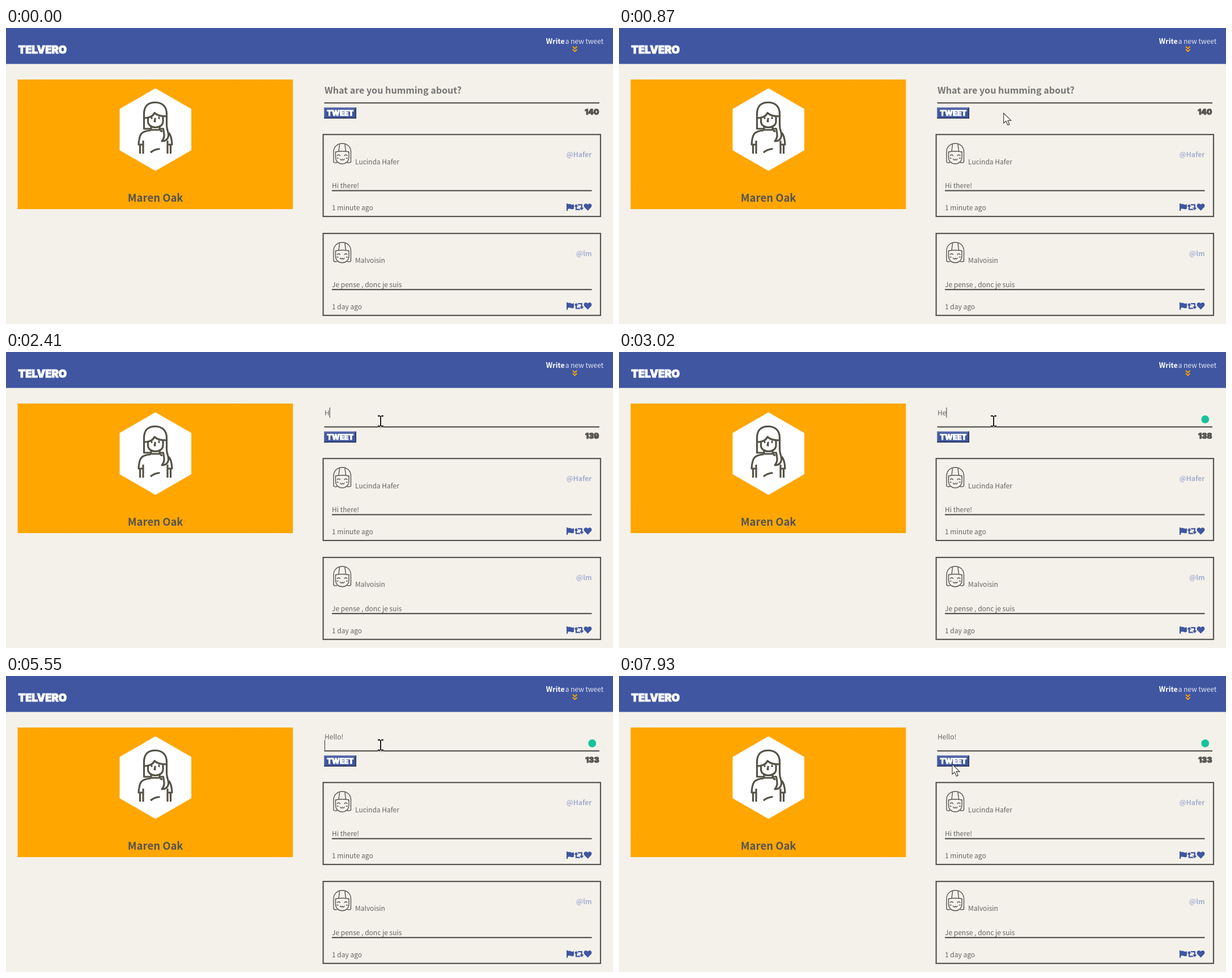
These frames come from a looping animation (1071x523 px, 8000 ms). An HTML page:

```html
<!DOCTYPE html>
<html lang="en">
<head>
<meta charset="utf-8">
<title>Short message page</title>
<style>
  html, body { margin: 0; width: 100%; height: 100%; overflow: hidden; background: #f4f1ea; }
  svg { display: block; width: 1071px; height: 523px; }
  text { font: 12px "Noto Sans CJK SC", "Noto Sans CJK JP", "Noto Sans CJK KR", "Noto Sans CJK", "Open Sans", sans-serif; }
  .thin { font-weight: 300; fill: #656562; }
  .semi { font-weight: 600; }
  .end { text-anchor: end; }
  .block { font-family: Inter, "DejaVu Sans", sans-serif; font-weight: 900; stroke-width: 1; }
  .white { fill: #fff; stroke: #fff; }
  .handle { fill: #a6afd1; }
  .line { fill: none; stroke: #545451; stroke-width: 2.2; }
  .face { fill: none; stroke: #555551; stroke-width: 1.4; stroke-linecap: round; }
  .person { fill: none; stroke: #545146; stroke-width: 3.2; stroke-linejoin: round; }
  .blue { fill: #4056a1; }
  .shadow { fill: #bec2d5; }
</style>
</head>
<body>
<svg viewBox="0 0 1071 523">
  <defs>
    <g id="girl" class="face">
      <path d="M578 237V219C578 199 608.500 199 608.500 219V237Q605 239 602 237.500M578 237Q581 239 584 237.500"/>
      <path d="M581.500 219V228C581.500 244 605 244 605 228V219"/>
      <path d="M581.500 219Q593 216.500 605 219M588.500 206L587 217.500M598 206L599.500 217.500"/>
      <path d="M584.500 225.500Q587 222.500 589.500 225.500M597 225.500Q599.500 222.500 602 225.500"/>
      <path d="M584 230H586M600.500 230H602.500M589.500 231.500Q591.500 235 593.300 232Q595 235 597 231.500"/>
    </g>
    <g id="icons" class="blue">
      <path d="M989 310H991.200V323H989ZM991.200 311.500Q994 310 996.500 311.500T1002 311.300V319.500Q999.500 321 996.500 319.800T991.200 320Z"/>
      <path d="M1006 311L1010 315.500H1007.200V319.500H1012L1014 321.700H1004.900V315.500H1002.200ZM1015.700 322L1019.600 317.500H1016.900V311.200H1008L1010 313.400H1014.600V317.500H1011.800Z"/>
      <path d="M1026.500 322.800L1020.800 317C1016.800 312 1023.300 307.500 1026.500 312C1029.700 307.500 1036.200 312 1032.200 317Z"/>
    </g>
    <g id="frame">
      <rect class="line" x="559.600" y="188.200" width="489.400" height="144.800" style="fill:#f4f1ea"/>
      <path class="line" d="M575 287.300H1033.500"/>
      <use href="#girl"/><use href="#icons"/>
    </g>
  </defs>

  <rect class="blue" width="1071" height="63.500"/>
  <text class="block white" x="21.500" y="44.500" style="font-size:18.500px">TELVERO</text>
  <text class="semi" x="952.800" y="27.500" fill="#fff" style="font-size:12.500px">Write</text>
  <text class="end" x="1054.300" y="27.500" fill="#e3e6f2" style="font-weight:300">a new tweet</text>
  <path d="M1000 32.800l3.700 3.600 3.700-3.600M1000 37.800l3.700 3.600 3.700-3.600" fill="none" stroke="#ffa600" stroke-width="2"/>

  <rect x="20.500" y="91" width="485.700" height="229" fill="#ffa600"/>
  <path id="specks" fill="none" stroke="#ffc95e" stroke-opacity=".4"/>
  <path d="M263.700 106.500L327 143V216L263.700 252.500L200.500 216V143Z" fill="#fff"/>
  <g class="person">
    <path d="M255 178H243.500V152C243.500 138 251 131.500 263 131.500C276 131.500 283.500 139 283.500 152V172C283.500 181 287.500 184 286.500 191C285.500 197 281 200 275 200C281 193 279 187 277.500 178H271"/>
    <path d="M250.500 159V165C250.500 179 277 179 277 165V155"/>
    <path d="M245 159C253 159 259 156 262 150C266 154 271 156 282 156"/>
    <path d="M256 174V180H271V174M263.500 159L262 165H264.500" />
    <path d="M257 156.500V161M270 156.500V161" stroke-width="2.600"/>
    <path d="M255 181C239 182 235 187 234 206H242M272 181L276 183M287 185C291 189 292.500 196 293 206H285"/>
    <path d="M242 199V222M285 199V222M236.500 206V222M290.500 206V222M255 220C260 215.500 265 214 271.500 213.500"/>
  </g>
  <text class="semi" x="263.700" y="307" fill="#545451" text-anchor="middle" style="font-size:18.500px">Maren Oak</text>

  <text id="prompt" class="semi" x="562" y="115.700" fill="#757575" style="font-size:16.100px">What are you humming about?</text>
  <text id="typed" class="thin" x="562" y="111.500"></text>
  <rect id="caret" width="1" height="18" fill="#333"/>
  <circle id="badge" cx="1034.300" cy="119" r="6.900" fill="#15c39a"/>
  <path class="line" d="M561.500 132.400H1047"/>
  <rect class="blue" x="561" y="140.500" width="57" height="19.500"/>
  <path d="M561.700 160V141.200H618" fill="none" stroke="#6f7fb9" stroke-width="1.400"/>
  <path d="M561 159.300H617.300V140.500" fill="none" stroke="#27314f" stroke-width="1.500"/>
  <text class="block white" x="566.300" y="155" style="font-size:12.800px;stroke-width:.8px">TWEET</text>
  <text id="count" class="block end" x="1046.500" y="153.300" fill="#545451" stroke="#545451" style="font-size:13.600px">140</text>

  <rect id="shade1" class="shadow" x="563.500" y="192" width="491" height="146.800"/>
  <use href="#frame"/>
  <text class="thin" x="616" y="240.500">Lucinda Hafer</text>
  <text class="semi handle end" x="1033.500" y="228.300">@Hafer</text>
  <text class="thin" x="575" y="283.300">Hi there!</text>
  <text class="thin" x="575" y="321.500">1 minute ago</text>

  <rect id="shade2" class="shadow" x="563.500" y="366.800" width="491" height="146.800"/>
  <use href="#frame" y="174.800"/>
  <text class="thin" x="616" y="415">Malvoisin</text>
  <text class="semi handle end" x="1033.500" y="402.800">@lm</text>
  <text class="thin" x="575" y="457.800">Je pense , donc je suis</text>
  <text class="thin" x="575" y="496.500">1 day ago</text>

  <g id="pointer">
    <path id="arrow" d="M0 0V17.500L4.200 13.900L7.300 21L10.200 19.700L7.200 12.900H13Z" fill="#fff" stroke="#333" stroke-width="1.100"/>
    <g id="beam" fill="none">
      <path d="M-5-9H5M-5 9H5M0-9V9" stroke="#fff" stroke-opacity=".8" stroke-width="3.600"/>
      <path d="M-5-9H-1M1-9H5M-5 9H-1M1 9H5M0-9V9" stroke="#111" stroke-width="1.900"/>
    </g>
  </g>
</svg>
<script>
  const LOOP = 8000, BLINK = 530;
  const FOCUS = 1390, ENTER = 5200, BLUR = 7130;
  const keys = [[2340, 'H'], [2830, 'e'], [3170, 'l'], [3330, 'l'], [3580, 'o'], [4580, '!'], [ENTER, '\n']];
  // time, x, y of the pointer
  const route = [
    [260, 815, 505], [400, 782, 395], [540, 751, 286], [600, 751, 286], [680, 715, 205],
    [820, 685, 160], [1010, 661, 124], [1080, 661, 122], [6390, 661, 122], [6440, 652, 131],
    [6510, 639, 141], [6600, 639, 141], [6720, 612, 156], [6930, 594, 163], [7130, 588, 160],
    [7850, 588, 160], [7930, 588, 156], [LOOP, 588, 156]
  ];
  const $ = id => document.getElementById(id);
  const show = (id, on) => $(id).setAttribute('visibility', on ? 'visible' : 'hidden');

  function scatter() {
    let seed = 7, d = '';
    const rnd = () => (seed = (seed * 16807) % 2147483647) / 2147483647;
    for (let i = 0; i < 420; i++) {
      d += `M${(21 + rnd() * 484).toFixed(1)} ${(92 + rnd() * 227).toFixed(1)}h1`;
    }
    $('specks').setAttribute('d', d);
  }

  function pointerAt(t) {
    const i = Math.max(1, route.findIndex(p => p[0] > t));
    const [t0, x0, y0] = route[i - 1], [t1, x1, y1] = route[i];
    const k = Math.max(0, (t - t0) / (t1 - t0));
    return [x0 + (x1 - x0) * k, y0 + (y1 - y0) * k];
  }

  function drawPointer(t) {
    const [x, y] = pointerAt(t), seen = t >= route[0][0];
    const beam = y > 96 && y < 134;
    $('pointer').setAttribute('transform', `translate(${x} ${y})`);
    show('arrow', seen && !beam);
    show('beam', seen && beam);
    show('shade1', seen && y > 187 && y < 334);
    show('shade2', seen && y > 362 && y < 509);
  }

  function drawInput(t) {
    const done = keys.filter(k => t >= k[0]);
    const last = done.length ? done[done.length - 1][0] : 0;
    const text = done.map(k => k[1]).join('').trim();
    if ($('typed').textContent !== text) $('typed').textContent = text;
    $('count').textContent = 140 - done.length;
    show('prompt', !done.length);
    show('badge', t >= 2600);

    const newLine = t >= ENTER;
    const width = text && !newLine ? $('typed').getComputedTextLength() : 0;
    $('caret').setAttribute('x', 562 + width);
    $('caret').setAttribute('y', newLine ? 113 : 98);
    const lit = !last || Math.floor((t - last) / BLINK) % 2 === 0;
    show('caret', t >= FOCUS && t < BLUR && lit);
  }

  function render(t) {
    drawPointer(t);
    drawInput(t);
  }

  let start;
  function tick(now) {
    start ??= now;
    render((now - start) % LOOP);
    requestAnimationFrame(tick);
  }
  scatter();
  render(0);
  requestAnimationFrame(tick);
</script>
</body>
</html>
```
